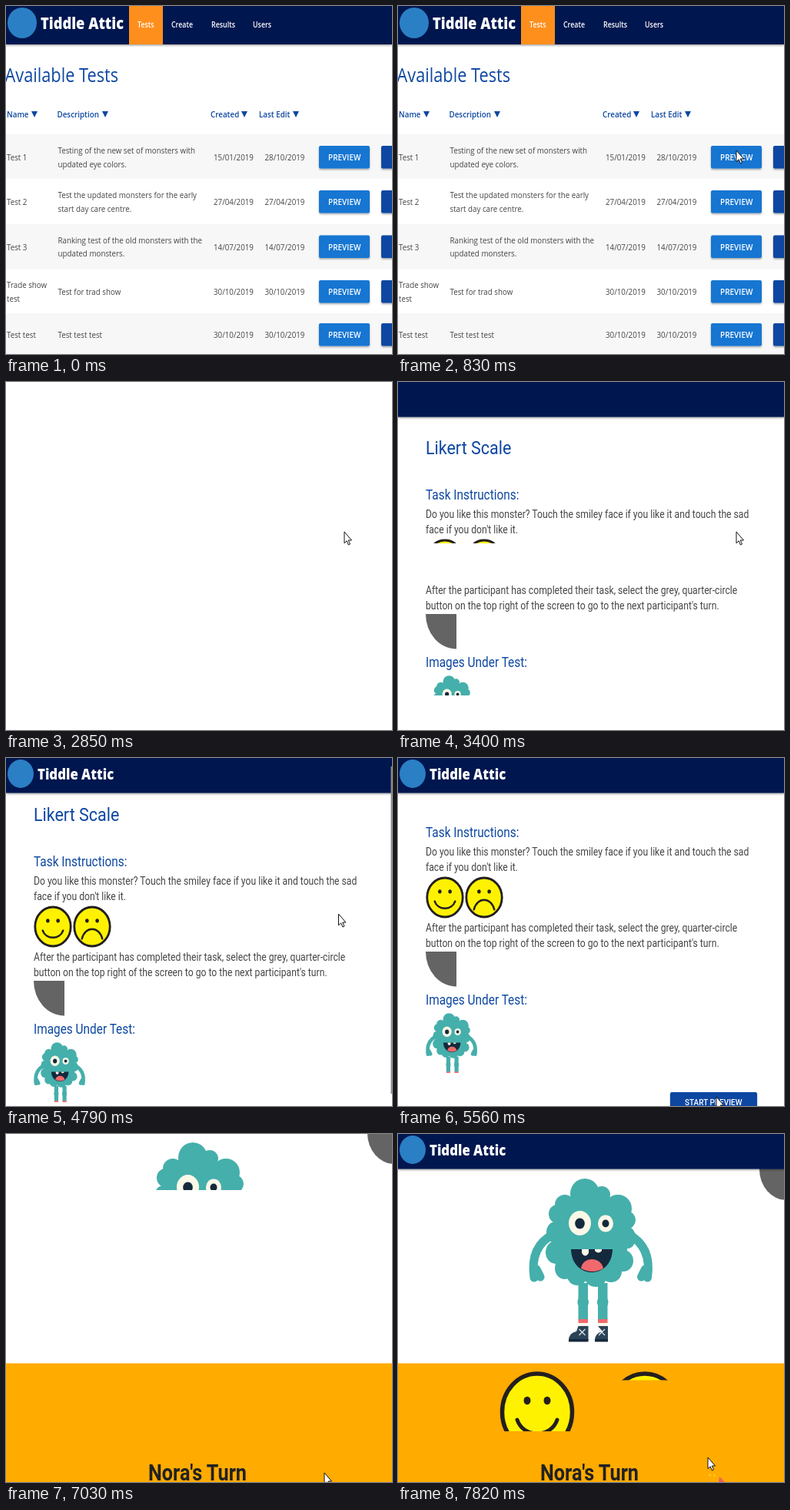
Animation of 502 by 453 pixels, one loop 8 s. Source, as an HTML page:

```html
<!DOCTYPE html>
<html lang="en">
<head>
<meta charset="utf-8">
<title>Test preview walkthrough</title>
<style>
html, body { margin: 0; width: 100%; height: 100%; overflow: hidden; background: #fff; }
svg { display: block; width: 502px; height: 453px; }
text { white-space: pre; }
</style>
</head>
<body>
<svg id="stage" viewBox="0 0 502 453" xmlns="http://www.w3.org/2000/svg"></svg>
<script>
const LOOP = 8000;
const SQUASH = 0.87;
const SANS = "'Open Sans', 'Noto Sans', sans-serif";
const ROBOTO = "Roboto, sans-serif";
const BLUE = "#0d47a1", MID = "#1976d2", NAVY = "#06134f", ORANGE = "#ff8f1c", GREY = "#646464";
const TEAL = "#45afab", INK = "#15293d", CREAM = "#fbf8e8", CORAL = "#f0696c";

const label = (x, y, str, size, fill, weight = 400, family = SANS) =>
  `<text transform="translate(${x} ${y}) scale(${SQUASH} 1)" font-family="${family}" font-size="${size}" font-weight="${weight}" fill="${fill}">${str}</text>`;
const rect = (x, y, w, h, fill, extra = "") =>
  `<rect x="${x}" y="${y}" width="${w}" height="${h}" fill="${fill}" ${extra}/>`;
const ellipse = (x, y, rx, ry, fill, extra = "") =>
  `<ellipse cx="${x}" cy="${y}" rx="${rx}" ry="${ry}" fill="${fill}" ${extra}/>`;
const path = (d, fill, extra = "") => `<path d="${d}" fill="${fill}" ${extra}/>`;
const reveal = (id, content) =>
  `<clipPath id="${id}"><rect y="-20" width="502" height="0"/></clipPath><g clip-path="url(#${id})">${content}</g>`;
const RAISED = 'rx="2" filter="url(#raised)"';

function homeScreen() {
  const rows = [
    [197, ["Test 1"], ["Testing of the new set of monsters with", "updated eye colors."], "15/01/2019", "28/10/2019"],
    [255, ["Test 2"], ["Test the updated monsters for the early", "start day care centre."], "27/04/2019", "27/04/2019"],
    [313.5, ["Test 3"], ["Ranking test of the old monsters with the", "updated monsters."], "14/07/2019", "14/07/2019"],
    [372, ["Trade show", "test"], ["Test for trad show"], "30/10/2019", "30/10/2019"],
    [428, ["Test test"], ["Test test test"], "30/10/2019", "30/10/2019"]
  ];
  const cell = (x, y, lines) => lines.map((line, i) =>
    label(x, y + 4 + (i - (lines.length - 1) / 2) * 17.3, line, 11.25, "#454545")).join("");
  const nav = [[171, "Tests"], [215, "Create"], [267, "Results"], [321, "Users"]];
  const heads = [[1, 33, "Name"], [66.5, 125, "Description"], [266, 306, "Created"], [329, 373, "Last Edit"]];
  const bands = [[167, 58], [284, 58.5], [400, 53]];

  return bands.map(([y, h]) => rect(0, y, 502, h, "#f7f7f7")).join("") +
    rect(0, 0, 502, 50, NAVY, 'filter="url(#raised)"') +
    rect(160, 0, 44, 50, ORANGE) +
    ellipse(21, 22, 19, 20, "#2b7fc4") +
    label(45, 30, "Tiddle Attic", 21, "#fff", 800) +
    nav.map(([x, s]) => label(x, 28, s, 10.2, "#fff", 600)).join("") +
    label(-1.5, 99, "Available Tests", 25, BLUE) +
    heads.map(([x, arrow, s]) => label(x, 145, s, 11.3, BLUE, 600) +
      path(`M${arrow} 137h8l-4 8z`, BLUE)).join("") +
    rows.map(([y, name, text, made, edited], i) =>
      cell(1, y, name) + cell(67.5, y, text) + cell(270, y, [made]) + cell(336.5, y, [edited]) +
      rect(407, y - 15, 66, 29.5, MID, RAISED + (i ? "" : ' id="preview"')) +
      rect(488, y - 15, 40, 29.5, BLUE, RAISED) +
      label(419, y + 4, "PREVIEW", 11.5, "#fff", 600)).join("");
}

function monster() {
  const puffs = [
    [250, 135, 50, 57], [243, 78, 19, 20], [265, 79, 11, 11], [286, 97, 18, 18], [217, 92, 13, 13],
    [207, 104, 11, 12], [299, 112, 10, 11], [205, 128, 12, 14], [299, 135, 10, 14], [205, 154, 13, 15],
    [293, 165, 13, 14], [217, 175, 13, 14], [233, 184, 13, 13], [257, 186, 14, 13], [277, 179, 14, 14]
  ];
  const shoe = (x, toe) =>
    rect(x, 194, 12.5, 48, TEAL) + ellipse(x + 6.2, 219, 7.3, 8, TEAL) +
    rect(x, 241, 12.5, 5, CORAL) + rect(x + 1, 246, 10.5, 5, CREAM) +
    path(`M${x} 250h13v19h${toe - x - 13}q0-10 10-12z`, "#2c4257") +
    path(`M${toe} 267h${x + 13 - toe}v3.500h${toe - x - 13}z`, INK) +
    path(`M${x + 1} 254l8 8m0-8l-8 8`, "none", 'stroke="#dfe8ec" stroke-width="1.2"');
  const arm = "M203 130C181 141 173 160 177 187M180 176l5 10";
  const armStyle = `stroke="${TEAL}" stroke-linecap="round"`;
  return path(arm, "none", armStyle + ' stroke-width="11"') +
    path(arm, "none", armStyle + ' stroke-width="11" transform="translate(501.500 0) scale(-1 1)"') +
    shoe(234.5, 222) + shoe(260, 256) +
    puffs.map(p => ellipse(...p, TEAL)).join("") +
    ellipse(236.500, 116, 14.5, 16, CREAM) + ellipse(236.500, 116.500, 6.3, 7, INK) +
    ellipse(270, 116.500, 10, 11, CREAM) + ellipse(270, 116.500, 4.5, 5, INK) +
    path("M225 150H279C278 190 226 190 225 150Z", INK) +
    path("M238 175C240 159 264 159 267 175Q253 183 238 175Z", CORAL) +
    path("M239 150h9v5q-4.500 7-9 0zM256 150h9v2q-4.500 5-9 0z", CREAM);
}

function smiley(x, y, scale, sad) {
  const mouth = sad ? "M-26 31C-18 -2 18 -2 26 31" : "M-26 10C-18 34 18 34 26 10";
  return `<g transform="translate(${x} ${y}) scale(${scale})" stroke-linecap="round">` +
    ellipse(0, 0, 45.5, 50, "#fff200", 'stroke="#231f20" stroke-width="5.500"') +
    ellipse(-13, -15, 4.5, 5.2, "#231f20") + ellipse(13, -15, 4.5, 5.2, "#231f20") +
    path(mouth, "none", 'stroke="#231f20" stroke-width="5"') + "</g>";
}

function taskScreen() {
  const body = [
    [177, "Do you like this monster? Touch the smiley face if you like it and touch the sad"],
    [197, "face if you don't like it."],
    [276, "After the participant has completed their task, select the grey, quarter-circle"],
    [296, "button on the top right of the screen to go to the next participant's turn."]
  ];
  return label(36, 94, "Likert Scale", 24.7, BLUE, 400, ROBOTO) +
    label(36, 153, "Task Instructions:", 17.7, BLUE, 400, ROBOTO) +
    body.map(([y, s]) => label(36, y, s, 14, "#454545", 400, ROBOTO)).join("") +
    reveal("facesClip", smiley(61, 231.500, 0.51) + smiley(112, 231.500, 0.51, true)) +
    path("M36 302H76V347.500A40 45.500 0 0 1 36 302Z", GREY) +
    label(36, 371, "Images Under Test:", 17.7, BLUE, 400, ROBOTO) +
    reveal("smallClip", `<g transform="translate(-34.700 358) scale(.416)">${monster()}</g>`) +
    rect(354, 485, 113, 31, BLUE, RAISED + ' id="start"') +
    label(373, 502, "START PREVIEW", 11.5, "#fff", 500, ROBOTO);
}

function turnScreen() {
  return `<g id="upper">${reveal("bigClip", monster())}${ellipse(505, 46, 35, 40, GREY)}</g>` +
    rect(0, 298.500, 502, 155, "#ffab00") +
    reveal("happyClip", smiley(181, 362, 1)) + reveal("sadClip", smiley(321, 362, 1, true)) +
    label(185, 451, "Nora's Turn", 29, "#212121", 700, ROBOTO) +
    `<g id="confetti">${path("M418 446l7 7h-8z", "#f0605c")}${path("M404 443l3 2m4-2l1 3", "none", 'stroke="#f5d327" stroke-width="2"')}</g>`;
}

document.getElementById("stage").innerHTML =
  `<defs><filter id="raised" x="-20%" y="-20%" width="140%" height="160%">
    <feDropShadow dx="0" dy="1.500" stdDeviation="1.200" flood-opacity=".35"/></filter></defs>` +
  rect(0, 0, 502, 453, "#fff") +
  `<g id="home">${homeScreen()}</g>
   <g id="task"><g id="scroller">${taskScreen()}</g></g>
   <g id="turn">${turnScreen()}</g>
   <g id="header">${rect(0, 0, 502, 45.500, NAVY, 'filter="url(#raised)"')}
     ${reveal("logoClip", ellipse(19, 20.500, 17, 18.500, "#2b7fc4") + label(41, 27.500, "Tiddle Attic", 19.3, "#fff", 800))}</g>
   ${rect(500.500, 11, 1.5, 426, "#8b8b8b", 'id="scrollbar"')}
   <g id="cursor">${path("M0 0V14.800L3.200 11.800 5.400 17 7.500 16 5.300 11H9.500Z", "#fff", 'stroke="#111" stroke-width="1"')}</g>`;

const el = Object.fromEntries([...document.querySelectorAll("[id]")].map(node => [node.id, node]));
const show = (node, on) => node.setAttribute("visibility", on ? "visible" : "hidden");
const move = (node, x, y) => node.setAttribute("transform", `translate(${x} ${y})`);
const clipTo = (id, bottom) => el[id].firstElementChild.setAttribute("height", Math.max(0, bottom + 20));
const lerp = (a, b, p) => a + (b - a) * p;

// Stepped progress: first of n steps lands at start, the last one at end.
function ramp(t, start, end, n) {
  if (t < start) return 0;
  if (t >= end) return 1;
  return (Math.floor((t - start) / (end - start) * (n - 1)) + 1) / n;
}

function mix(from, to, p) {
  const channel = (hex, i) => parseInt(hex.slice(i, i + 2), 16);
  return `rgb(${[1, 3, 5].map(i => Math.round(lerp(channel(from, i), channel(to, i), p)))})`;
}

// start, end, steps, x, y
const cursorMoves = [
  [130, 660, 8, 435, 195], [830, 830, 1, 440, 188], [1530, 1530, 1, 430, 184],
  [1680, 1920, 4, 440, 195], [3630, 3860, 4, 432.5, 203],
  [5250, 5560, 5, 414, 441], [7420, 7820, 6, 403, 421]
];

function cursorAt(t) {
  let x = 423, y = 458;
  for (const [start, end, n, toX, toY] of cursorMoves) {
    const p = ramp(t, start, end, n);
    x = lerp(x, toX, p);
    y = lerp(y, toY, p);
  }
  return [x, y];
}

function render(t) {
  const onTask = t >= 3400 && t < 6800, onTurn = t >= 7030;
  show(el.home, t < 2850);
  show(el.task, onTask);
  show(el.turn, onTurn);
  show(el.header, onTask || t >= 7110);
  show(el.scrollbar, t >= 4790 && t < 5560);
  el.scrollbar.setAttribute("opacity", 1 - ramp(t, 5250, 5560, 5));

  el.preview.setAttribute("fill", mix(MID, ORANGE, ramp(t, 1680, 1920, 4)));
  el.start.setAttribute("fill", mix(BLUE, ORANGE, ramp(t, 6030, 6340, 5)));

  const scroll = t < 4790 ? 0 : t < 4865 ? 12 : t < 4940 ? 35 : 50;
  move(el.scroller, 0, -scroll);
  clipTo("smallClip", lerp(408, 460, ramp(t, 3630, 3860, 4)));
  clipTo("facesClip", lerp(210, 262, ramp(t, 3630, 4090, 6)));
  clipTo("logoClip", 45 * (onTurn ? ramp(t, 7420, 7820, 6) : ramp(t, 3630, 4090, 6)));

  move(el.upper, 0, t < 7110 ? -47 - 4 * 0 : 0);
  clipTo("bigClip", lerp(120, 275, ramp(t, 7110, 7270, 3)));
  const faces = ramp(t, 7420, 7820, 6);
  clipTo("happyClip", lerp(300, 387, faces));
  clipTo("sadClip", lerp(300, 320.5, faces));
  show(el.confetti, t >= 7740);

  move(el.cursor, ...cursorAt(t));
}

function frame() {
  render(performance.now() % LOOP);
  requestAnimationFrame(frame);
}
frame();
</script>
</body>
</html>
```
